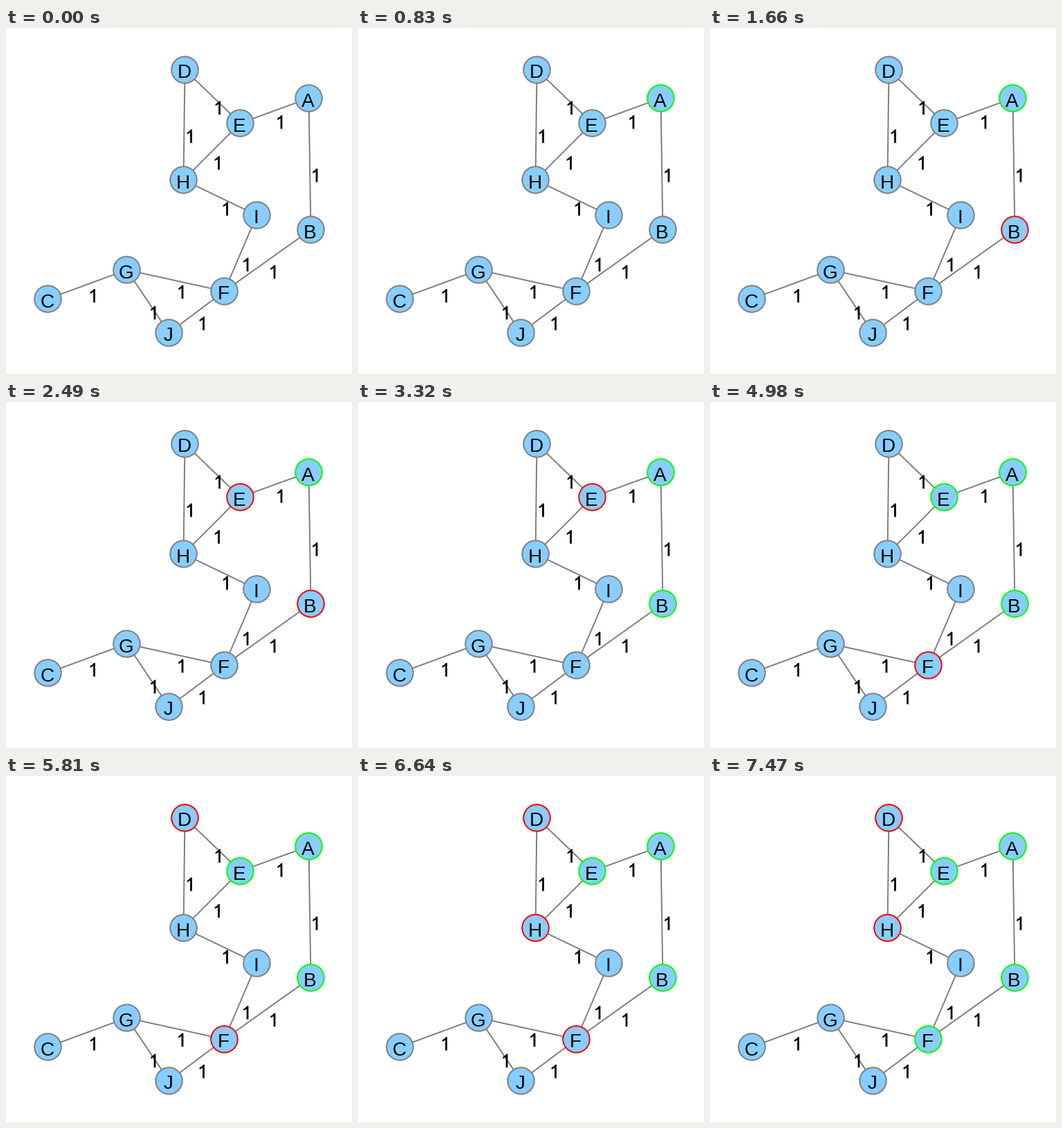
Animation, 500 px wide and 500 px high, one loop 8000 ms. Source, as a matplotlib script:

```python
import matplotlib.pyplot as plt
from matplotlib.animation import FuncAnimation
from matplotlib.collections import LineCollection, PatchCollection, PolyCollection
from matplotlib.patches import Circle

SIZE, DPI = 500, 100
PT = 72 / DPI  # points per pixel
LOOP, INTERVAL, STEP = 8000, 20, 830

GRAY, RED, GREEN, BLUE = "#808080", "#ff0000", "#00ff00", "#87ceff"

NODES = {
    "A": (437, 101), "B": (440, 291), "C": (60, 391), "D": (258, 60),
    "E": (338, 137), "F": (315, 380), "G": (174, 349), "H": (256, 219),
    "I": (362, 270), "J": (235, 440),
}
EDGES = "AB AE BF CG DE DH EH FG FI FJ GJ HI".split()

# One node changes its ring at each step of the search.
STEPS = [("A", GREEN), ("B", RED), ("E", RED), ("B", GREEN), ("F", RED),
         ("E", GREEN), ("D", RED), ("H", RED), ("F", GREEN)]

# Outline of the digit one, relative to the middle of its edge.
ONE = [(11.4, 6.6), (11.4, 26.2), (8.6, 26.2), (8.6, 11), (6.8, 12.3),
       (4.2, 13.5), (4.2, 11.1), (7.4, 9), (9.5, 6.6)]


def center(name):
    x, y = NODES[name]
    return x + 0.5, y + 0.5


def weight_label(edge):
    (x0, y0), (x1, y1) = map(center, edge)
    mx, my = (x0 + x1) / 2, (y0 + y1) / 2
    return [(mx + x, my + y) for x, y in ONE]


fig = plt.figure(figsize=(SIZE / DPI, SIZE / DPI), dpi=DPI, facecolor="white")
ax = fig.add_axes([0, 0, 1, 1])
ax.set_xlim(0, SIZE)
ax.set_ylim(SIZE, 0)
ax.axis("off")

ax.add_collection(LineCollection([[center(n) for n in e] for e in EDGES],
                                 colors=GRAY, linewidths=2 * PT, zorder=1))
rings = PatchCollection([Circle(center(n), 19.25) for n in NODES],
                        facecolor=BLUE, edgecolor=GRAY,
                        linewidth=2 * PT, zorder=2)
ax.add_collection(rings)
ax.add_collection(PolyCollection([weight_label(e) for e in EDGES],
                                 facecolors="black", edgecolors="none", zorder=3))
for name in NODES:
    x, y = center(name)
    ax.text(x - 1, y + 12, name, family="Liberation Sans", size=28 * PT,
            ha="center", va="baseline", color="black", zorder=4)


def update(i):
    # Look half an interval ahead so that each step falls on its nearest tick.
    done = int((i + 0.5) * INTERVAL // STEP)
    colors = dict.fromkeys(NODES, GRAY)
    colors.update(STEPS[:done])
    rings.set_edgecolor(list(colors.values()))
    return [rings]


anim = FuncAnimation(fig, update, frames=LOOP // INTERVAL, interval=INTERVAL,
                     init_func=lambda: update(0), repeat=True, repeat_delay=0)
plt.show()
```
